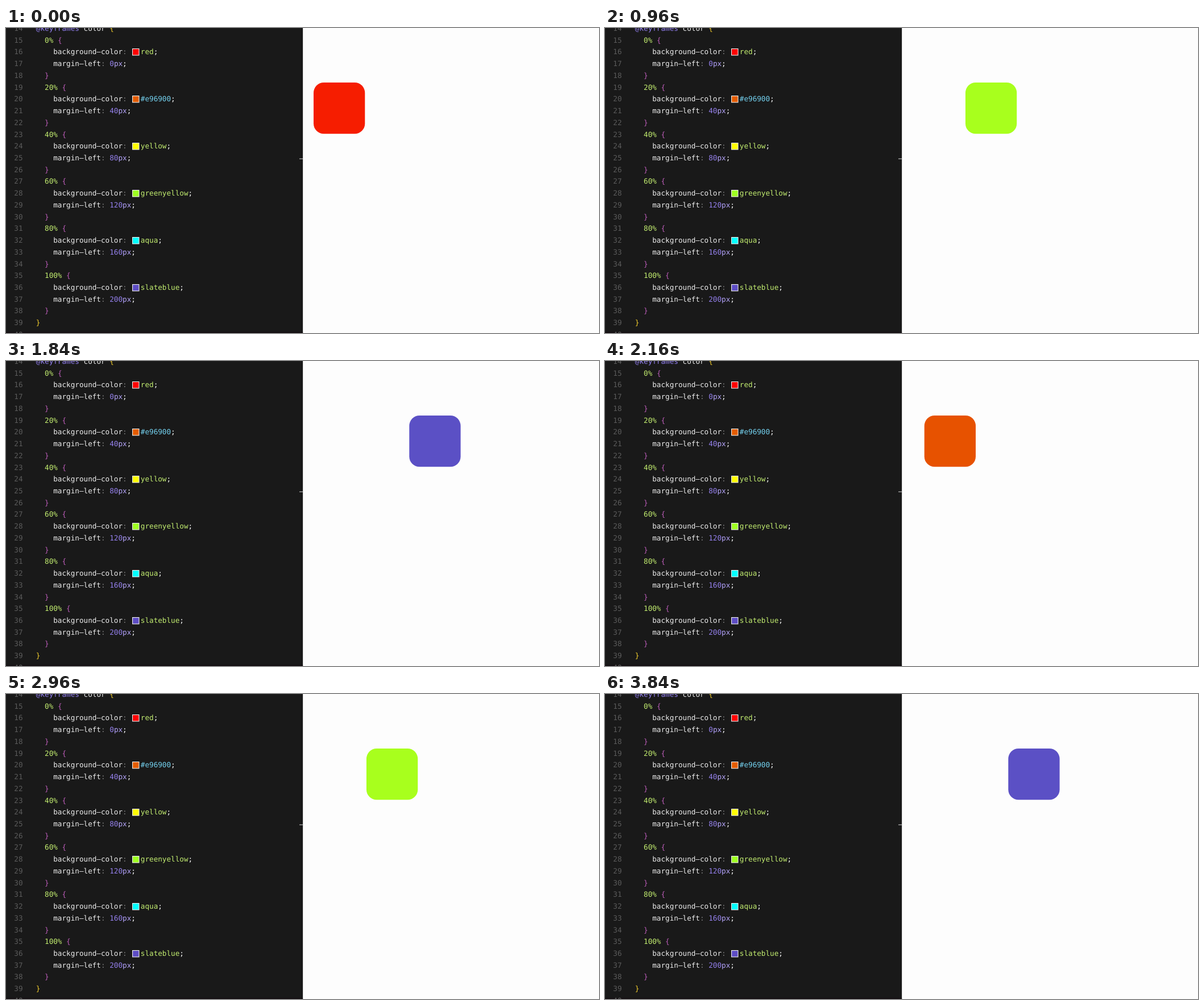
Recreate the animation shown at these times as an HTML page with a canvas. Size 1043x537 px, loop 3.92 s.

```html
<!DOCTYPE html>
<html lang="en">
<head>
<meta charset="utf-8">
<title>Keyframe colours</title>
<style>
  html, body { margin: 0; width: 100%; height: 100%; overflow: hidden; background: #fdfdfd; }
  canvas { display: block; }
</style>
</head>
<body>
<canvas id="stage" width="1043" height="537"></canvas>
<script>
const ctx = document.getElementById('stage').getContext('2d');

const LOOP = 3920, STEP = 80;          // playback, ms
const CYCLE = 2000, LEAD = 84;         // the box animation, ms
const FONT = 12.65, CHAR = FONT * 0.602, LINE = 20.73;
const CODE_X = 52.8, EDGE = 522.4;
const SCALE = 0.903, BOX_X = 529.5, BOX_Y = 96;

const INK = {
  bg: '#191919', page: '#fdfdfd', num: '#5b5b5b', text: '#ececec', rule: '#927ff0',
  outer: '#ecc92c', inner: '#bb5cb8', value: '#c3ee70', colon: '#7d7d7d', end: '#ffffff',
  digit: '#9580ee', unit: '#b5a5fa', hex: '#74d2f0'
};

const stops = [
  { name: 'red', rgb: [255, 0, 0] },
  { name: '#e96900', rgb: [228, 92, 0] },
  { name: 'yellow', rgb: [255, 252, 0] },
  { name: 'greenyellow', rgb: [158, 255, 33] },
  { name: 'aqua', rgb: [0, 255, 255] },
  { name: 'slateblue', rgb: [93, 76, 196] }
];

const css = rgb => `rgb(${rgb.map(Math.round).join(',')})`;
const mix = (a, b, k) => a + (b - a) * k;

// CSS "ease": cubic-bezier(.25, .1, .25, 1)
function ease(p) {
  const curve = (a, b, u) => 3 * a * u * (1 - u) ** 2 + 3 * b * u * u * (1 - u) + u ** 3;
  let lo = 0, hi = 1;
  for (let i = 0; i < 24; i++) {
    const mid = (lo + hi) / 2;
    if (curve(0.25, 0.25, mid) < p) lo = mid; else hi = mid;
  }
  return curve(0.1, 1, lo);
}

const lineY = n => 21.5 + (n - 15) * LINE;

function put(str, x, n, color) {
  ctx.fillStyle = color;
  ctx.fillText(str.replace('-', '\u2013'), x, lineY(n) + 4.2);
}

// Writes [text, colour] pairs from x along the character grid
function write(n, x, parts) {
  for (const [str, color] of parts) {
    put(str, x, n, color);
    x += str.length * CHAR;
  }
}

const indent = cols => CODE_X + cols * CHAR;

function swatch(n, rgb) {
  const y = Math.round(lineY(n) - 6.1);
  ctx.fillStyle = '#f0f0f0';
  ctx.fillRect(222, y, 12.5, 12.5);
  ctx.fillStyle = css(rgb);
  ctx.fillRect(223.1, y + 1.1, 10.3, 10.3);
}

function drawEditor() {
  ctx.fillStyle = INK.bg;
  ctx.fillRect(0, 0, EDGE, 537);
  ctx.fillStyle = '#130e11';
  ctx.fillRect(0, 535, EDGE, 2);
  ctx.fillStyle = '#b8b8b8';
  ctx.fillRect(516, 229.7, 6, 1.2);

  ctx.font = `${FONT}px "DejaVu Sans Mono", "Liberation Mono", monospace`;
  ctx.textRendering = 'geometricPrecision';
  for (let n = 14; n <= 40; n++) put(String(n), 14.3, n, INK.num);

  write(14, indent(0), [['@keyframes', INK.rule], [' color ', INK.text], ['{', INK.outer]]);
  stops.forEach(({ name, rgb }, i) => {
    const n = 15 + i * 4;
    write(n, indent(2), [[`${i * 20}% `, INK.value], ['{', INK.inner]]);
    write(n + 1, indent(4), [['background-color', INK.text], [':', INK.colon]]);
    swatch(n + 1, rgb);
    write(n + 1, 236.8, [[name, name[0] === '#' ? INK.hex : INK.value], [';', INK.end]]);
    write(n + 2, indent(4), [['margin-left', INK.text], [': ', INK.colon],
      [String(i * 40), INK.digit], ['px', INK.unit], [';', INK.end]]);
    write(n + 3, indent(2), [['}', INK.inner]]);
  });
  write(39, indent(0), [['}', INK.outer]]);
}

function drawBox(ms) {
  const pos = (ms + LEAD) % CYCLE / CYCLE * 5;
  const i = Math.floor(pos), k = ease(pos - i);
  const from = stops[i].rgb, to = stops[i + 1].rgb;
  ctx.fillStyle = INK.page;
  ctx.fillRect(EDGE, 0, 1043 - EDGE, 537);
  ctx.fillStyle = css(from.map((c, j) => mix(c, to[j], k)));
  ctx.beginPath();
  ctx.roundRect(BOX_X + (i + k) * 40 * SCALE, BOX_Y, 100 * SCALE, 100 * SCALE, 20 * SCALE);
  ctx.fill();
}

const start = performance.now();
function frame() {
  const t = (performance.now() - start) % LOOP;
  ctx.clearRect(0, 0, 1043, 537);
  drawEditor();
  drawBox(Math.floor(t / STEP) * STEP);
  requestAnimationFrame(frame);
}

frame();
</script>
</body>
</html>
```
